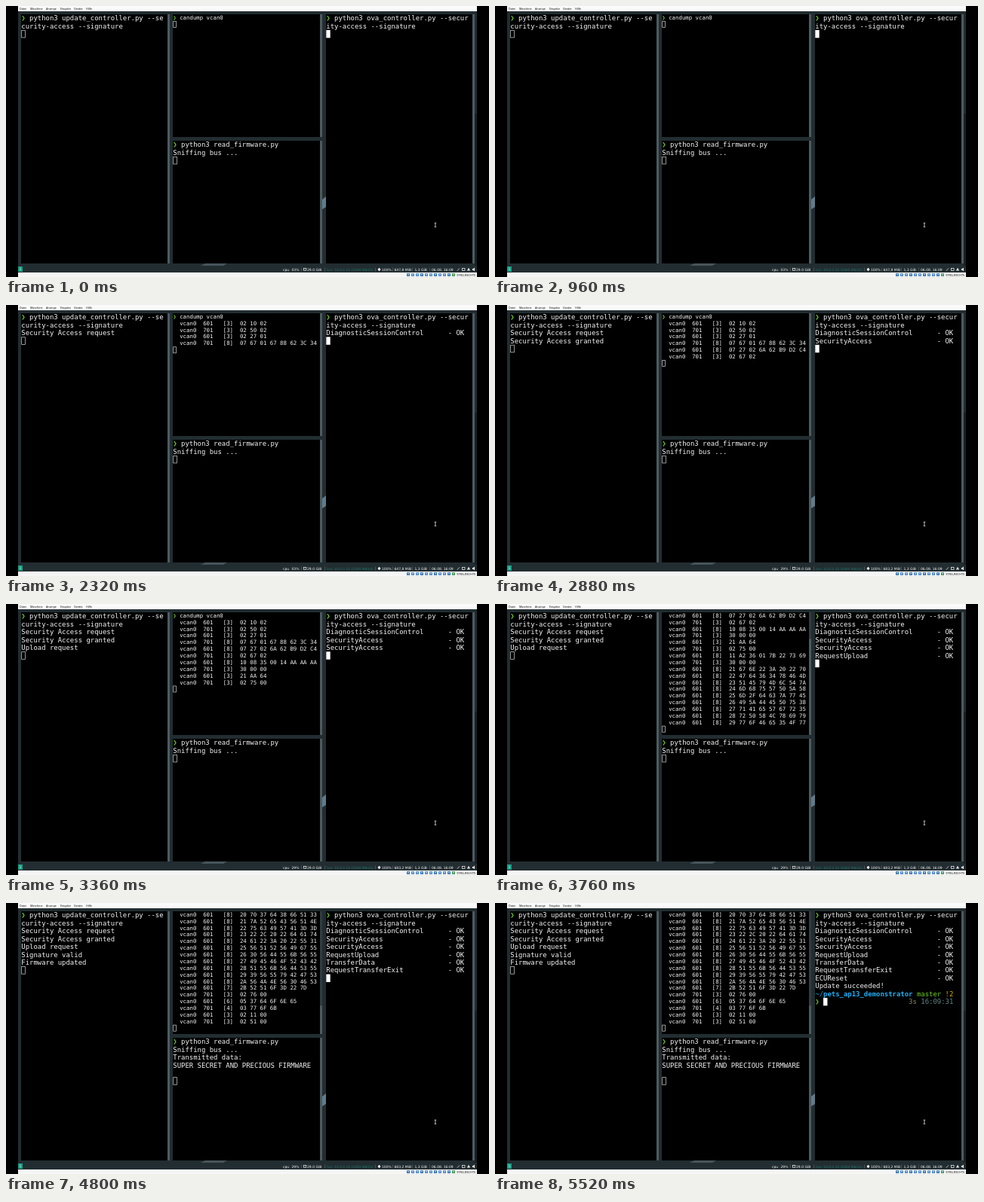
Recreate the animation shown at these times as an HTML page with a canvas. Size 640x360 px, loop 5760 ms.

```html
<!DOCTYPE html>
<html lang="en">
<head>
<meta charset="utf-8">
<title>Terminal session</title>
<style>
  html, body { margin: 0; width: 100%; height: 100%; overflow: hidden; background: #000; }
  canvas { display: block; width: 640px; height: 360px; }
</style>
</head>
<body>
<canvas id="stage"></canvas>
<script>
const LOOP = 5760;
const W = 640, H = 360;
const MONO = '"DejaVu Sans Mono", monospace';
const SANS = '"DejaVu Sans", sans-serif';
const MENU = '"Noto Sans", sans-serif';
const WHITE = '#f4f4f4', GREEN = '#6fd31a', SLATE = '#222d31', THUMB = '#4c5b60';

const canvas = document.getElementById('stage');
const ctx = canvas.getContext('2d');
const scale = window.devicePixelRatio || 1;
canvas.width = W * scale;
canvas.height = H * scale;
ctx.scale(scale, scale);

// Cell sizes of the two terminal fonts.
const BIG = { size: 8.942, cw: 5.383, lh: 10.45 };
const SMALL = { size: 7.364, cw: 4.433, lh: 8.867 };

const PANES = {
  left:   { x: 20, y: 11, w: 194, h: 331, font: BIG },
  dump:   { x: 221, y: 11, w: 195, h: 163, font: SMALL, rows: 18 },
  sniff:  { x: 221, y: 179, w: 195, h: 163, font: BIG },
  right:  { x: 424, y: 11, w: 194, h: 331, font: BIG, active: true }
};

function rect(x, y, w, h, color) {
  ctx.fillStyle = color;
  ctx.fillRect(x, y, w, h);
}

function poly(color, ...points) {
  ctx.fillStyle = color;
  ctx.beginPath();
  points.forEach(([x, y]) => ctx.lineTo(x, y));
  ctx.fill();
}

function label(text, x, y, size, color, family) {
  ctx.font = `${size}px ${family}`;
  ctx.fillStyle = color;
  ctx.fillText(text, x, y);
}

// ---- CAN traffic ----

const hex = n => n.toString(16).toUpperCase().padStart(2, '0');

function can(id, bytes) {
  const count = bytes.split(' ').length;
  return `  vcan0  ${id}   [${count}]  ${bytes}`;
}

function randomBase64(count) {
  const chars = 'ABCDEFGHIJKLMNOPQRSTUVWXYZabcdefghijklmnopqrstuvwxyz0123456789+/';
  let seed = 1309, out = '';
  while (out.length < count) {
    seed = (seed * 1103515245 + 12345) % 2147483648;
    out += chars[Math.floor(seed / 2147483648 * 64)];
  }
  return out;
}

// Splits a payload into a first frame, flow control and consecutive frames.
function transfer(payload) {
  const bytes = [...payload].map(c => hex(c.charCodeAt(0)));
  const size = bytes.length + 2;
  const out = [
    can(601, [hex(16 + (size >> 8)), hex(size & 255), '36 01', ...bytes.slice(0, 4)].join(' ')),
    can(701, '30 00 00')
  ];
  for (let i = 4, n = 1; i < bytes.length; i += 7, n++) {
    out.push(can(601, [hex(32 + n % 16), ...bytes.slice(i, i + 7)].join(' ')));
  }
  out.push(can(701, '02 76 00'));
  return out;
}

const signature = randomBase64(295) + 'ttmxc4rp1SyEWCR/jp5uiiARZ64Ap7d8fQ3zReCVQNucIWA==';
const firmware = btoa('SUPER SECRET AND PRECIOUS FIRMWARE\n');
const upload = transfer(`{"sign": "${signature}", "data": "${firmware}"}`);

// ---- Terminal contents: [time, line] ----

const prompt = text => [[0, '❯', GREEN], [2, text, WHITE]];
const ok = name => name.padEnd(30) + '- OK';

const script = {
  left: [
    [0, prompt('python3 update_controller.py --se')],
    [0, 'curity-access --signature'],
    [2320, 'Security Access request'],
    [2800, 'Security Access granted'],
    [3280, 'Upload request'],
    [4160, 'Signature valid'],
    [4160, 'Firmware updated']
  ],
  dump: [
    [0, prompt('candump vcan0')],
    [1760, can(601, '02 10 02')],
    [1760, can(701, '02 50 02')],
    [2320, can(601, '02 27 01')],
    [2320, can(701, '07 67 01 67 88 62 3C 34')],
    [2800, can(601, '07 27 02 6A 62 B9 D2 C4')],
    [2800, can(701, '02 67 02')],
    [3280, can(601, '10 08 35 00 14 AA AA AA')],
    [3280, can(701, '30 00 00')],
    [3280, can(601, '21 AA 64')],
    [3280, can(701, '02 75 00')],
    ...upload.map((line, i) => [3760 + 80 * Math.floor(i * 6 / upload.length), line]),
    [4320, can(601, '05 37 64 6F 6E 65')],
    [4320, can(701, '03 77 6F 6B')],
    [4800, can(601, '02 11 00')],
    [4800, can(701, '02 51 00')]
  ],
  sniff: [
    [0, prompt('python3 read_firmware.py')],
    [0, 'Sniffing bus ...'],
    [4160, 'Transmitted data:'],
    [4160, 'SUPER SECRET AND PRECIOUS FIRMWARE'],
    [4160, '']
  ],
  right: [
    [0, prompt('python3 ova_controller.py --secur')],
    [0, 'ity-access --signature'],
    [2320, ok('DiagnosticSessionControl')],
    [2800, ok('SecurityAccess')],
    [3280, ok('SecurityAccess')],
    [3760, ok('RequestUpload')],
    [4320, ok('TransferData')],
    [4800, ok('RequestTransferExit')],
    [5280, ok('ECUReset')],
    [5280, 'Update succeeded!'],
    [5520, [[0, '~/', '#0a9fd8'], [2, 'pets_ap13_demonstrator', '#1fb0f5', 'bold '],
            [25, 'master', GREEN], [32, '!2', '#d7af00']]]
  ]
};

function drawPane(name, t) {
  const { x, y, w, h, font, rows, active } = PANES[name];
  const { size, cw, lh } = font;
  const left = x + 0.3;
  const lines = script[name].filter(([at]) => t >= at).map(entry => entry[1]);
  const total = lines.length + 1;
  const skip = rows ? Math.max(0, total - rows) : 0;
  const atPrompt = active && t >= 5520;

  rect(x, y, w, h, '#000');
  const thumb = skip ? h * rows / total : h;
  rect(x + w, y, 3, h, '#2f3c41');
  rect(x + w, y + h - thumb, 3, thumb, THUMB);

  const write = (row, line) => {
    const parts = typeof line === 'string' ? [[0, line, WHITE]] : line;
    for (const [col, text, color, weight = ''] of parts) {
      ctx.font = `${weight}${size}px ${MONO}`;
      ctx.fillStyle = color;
      ctx.fillText(text, left + col * cw, y + row * lh + size * 0.928);
    }
  };
  lines.slice(skip).forEach((line, row) => write(row, line));

  const row = lines.length - skip;
  if (atPrompt) write(row, [[0, '❯', GREEN], [23, '3s', '#87875f'], [26, '16:09:31', '#5f8787']]);
  const cx = left + (atPrompt ? 2 * cw : 0), cy = y + row * lh;
  if (active) {
    rect(cx, cy, cw, lh, '#fff');
  } else {
    ctx.strokeStyle = '#d8d8d8';
    ctx.lineWidth = 0.7;
    ctx.strokeRect(cx + 0.4, cy + 0.4, cw - 0.6, lh - 0.8);
  }
}

// ---- Desktop around the terminals ----

function drawMenu() {
  rect(16, 0, 608, 7, '#fafafa');
  const items = [['Datei', 18], ['Maschine', 32], ['Anzeige', 53], ['Eingabe', 72], ['Geräte', 90], ['Hilfe', 106]];
  for (const [text, x] of items) label(text, x, 4.8, 3.7, '#111', MENU);
}

function drawWallpaper() {
  rect(16, 7, 608, 347, SLATE);
  rect(621, 143, 3, 202, '#182125');
  poly('#607b8b', [419, 257], [424, 253], [424, 267], [419, 270]);
  poly('#46555a', [258, 345], [264, 342], [293, 342], [288, 345]);
}

function drawStatus(t) {
  const busy = t >= 2560;
  rect(16, 345, 608, 9, SLATE);
  rect(16, 346, 6, 7, '#16a085');
  label('1', 17.6, 351.4, 4.6, WHITE, SANS);
  const items = [
    ['cpu', 367], [busy ? '29%' : '03%', 378.5], ['29.0 GiB', 399],
    ['100%', 498], [busy ? '683,2 MiB' : '647,8 MiB', 514.5],
    ['1,3 GiB', 541.5], ['06.08. 16:09', 564]
  ];
  for (const [text, x] of items) label(text, x, 351.6, 4.5, WHITE, SANS);
  label('tun: 10.0.2.15 (1000 Mbit/s)', 425, 351.6, 4.4, '#1d7467', SANS);
  for (const x of [391.5, 422, 489.5, 512.5, 538.5, 561.5]) rect(x, 347.5, 0.5, 5, '#6c7679');

  ctx.strokeStyle = WHITE;
  ctx.lineWidth = 0.7;
  ctx.strokeRect(394.6, 348.4, 3.2, 2.8);
  poly(WHITE, [492.5, 350], [494.5, 347.8], [496.5, 350], [494.5, 352.2]);

  // Tray: clip, screen, bell, speaker.
  ctx.beginPath();
  ctx.moveTo(597.8, 351.8);
  ctx.lineTo(601, 348.4);
  ctx.stroke();
  ctx.strokeRect(604.6, 348.6, 3.4, 2.8);
  poly(WHITE, [611, 351.6], [613, 347.8], [615, 351.6]);
  poly(WHITE, [618, 349], [619.2, 349], [621, 347.6], [621, 352.2], [619.2, 351], [618, 351]);
}

function drawHostBar() {
  rect(16, 354, 608, 6, '#f6f6f6');
  for (let i = 0; i < 11; i++) {
    const x = 531 + i * 6;
    rect(x, 355.2, 4, 3.8, i === 10 ? '#3f9a4c' : i % 3 ? '#4d86c6' : '#2f6fae');
    rect(x + 1, 356.2, 2, 1.3, '#b9d3ec');
  }
  label('STRG-RECHTS', 597.2, 358.7, 3.9, '#111', MENU);
}

function drawPointer() {
  rect(568.5, 288, 0.9, 5.6, '#ddd');
  rect(567.6, 287.8, 2.7, 0.7, '#ddd');
  rect(567.6, 293.1, 2.7, 0.7, '#ddd');
}

function draw(t) {
  rect(0, 0, W, H, '#000');
  drawWallpaper();
  drawMenu();
  Object.keys(PANES).forEach(name => drawPane(name, t));
  drawStatus(t);
  drawHostBar();
  drawPointer();
}

function tick() {
  draw(performance.now() % LOOP);
  requestAnimationFrame(tick);
}
tick();
</script>
</body>
</html>
```
